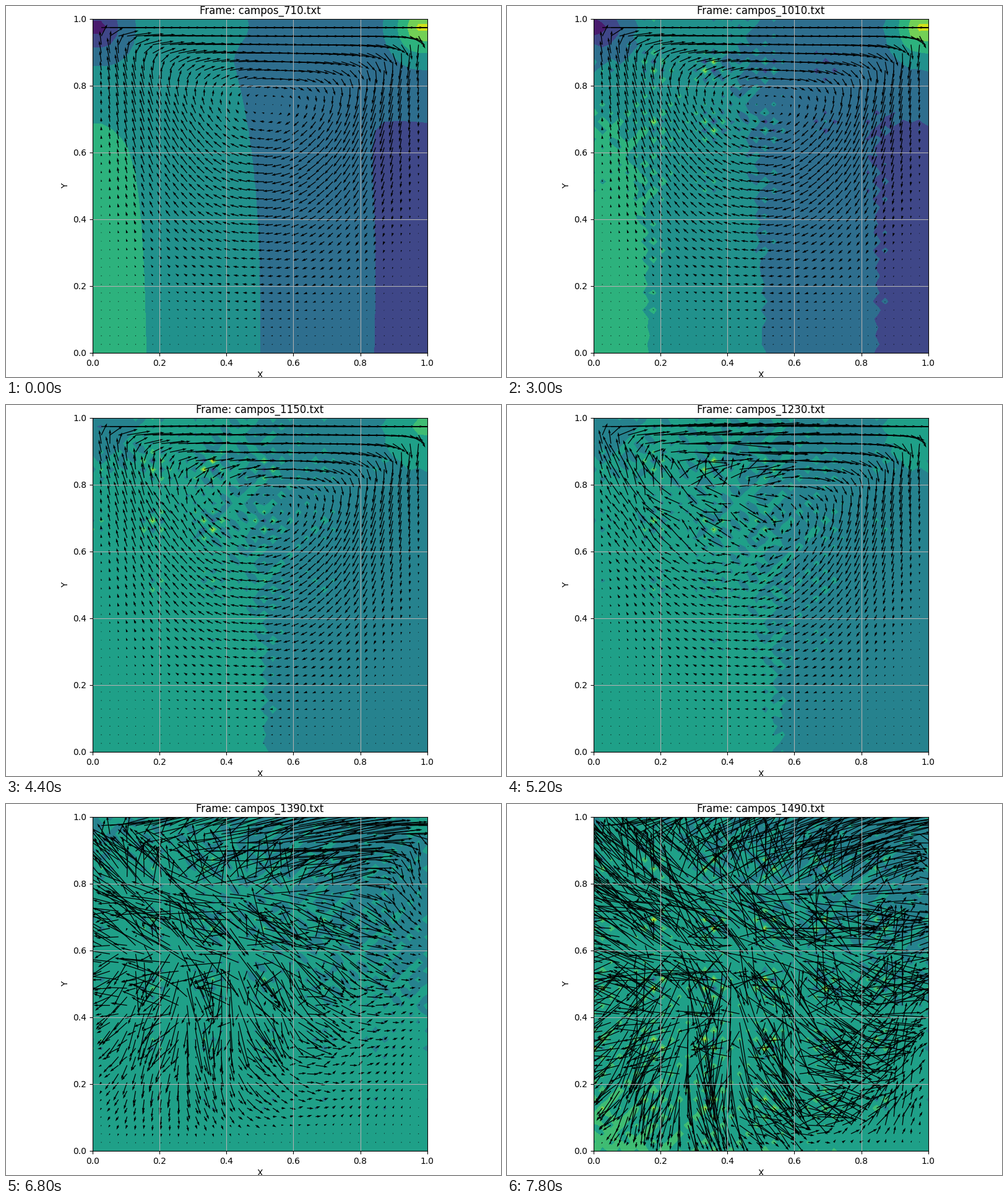
Write a matplotlib script that moves like this. It is 800 px wide and 600 px high and loops after 7900 ms.

```python
import numpy as np
import matplotlib.pyplot as plt
from matplotlib.animation import FuncAnimation

N = 40
H = 1 / (N - 1)
FRAMES = 79
SCALE = 7
INNER = (slice(1, -1), slice(1, -1))

axis = np.linspace(0, 1, N)
X, Y = np.meshgrid(axis, axis)
I, J = np.meshgrid(np.arange(N), np.arange(N))
noise = np.random.default_rng(4).normal(0, 0.25, (2, N, N))

# Stages of the numerical instability
KEYS = [0, 20, 36, 52, 60, 68, 78]
PRESSURE = [0.03, 1.2, 6, 16, 25, 42, 75]
DRIFT = [0.001, 0.004, 0.02, 0.22, 1.1, 7, 18]
VELOCITY = [1e-4, 5e-4, 0.005, 0.05, 0.095, 0.15, 0.21]
RADIUS = [0.28, 0.28, 0.28, 0.31, 0.39, 0.49, 0.6]
CENTRE_X = [0.36, 0.36, 0.36, 0.36, 0.36, 0.38, 0.45]
CENTRE_Y = [0.83, 0.83, 0.83, 0.82, 0.78, 0.71, 0.6]


def at(i, values):
    return np.interp(i, KEYS, values)


def grow(i, values):
    return np.exp(at(i, np.log(values)))


def cavity_flow(nu=1 / 15, dt=0.0015, steps=500):
    """Lid-driven cavity in vorticity / stream function form."""
    k = np.arange(1, N - 1)
    S = np.sqrt(2 * H) * np.sin(np.pi * H * np.outer(k, k))
    lam = (2 - 2 * np.cos(np.pi * k * H)) / H**2
    lam = lam[:, None] + lam
    psi, w = np.zeros((N, N)), np.zeros((N, N))
    for _ in range(steps):
        psi[INNER] = S @ ((S @ w[INNER] @ S) / lam) @ S
        w[0], w[:, 0] = -2 * psi[1] / H**2, -2 * psi[:, 1] / H**2
        w[:, -1] = -2 * psi[:, -2] / H**2
        w[-1] = -2 * psi[-2] / H**2 - 2 / H
        py, px = np.gradient(psi, H)
        wy, wx = np.gradient(w, H)
        lap = (w[1:-1, 2:] + w[1:-1, :-2] + w[2:, 1:-1] + w[:-2, 1:-1]
               - 4 * w[INNER]) / H**2
        w[INNER] += dt * (nu * lap - (py * wx - px * wy)[INNER])
    u, px = np.gradient(psi, H)
    u[-1], px[-1] = 1, 0
    # The lid lies one node below the ghost row
    return np.roll(u, -1, axis=0), np.roll(-px, -1, axis=0)


def corner(x0, sx, sy):
    xc = np.clip(X, H, 1 - H)
    return np.exp(-np.hypot((xc - x0) / sx, (Y - 1 + H) / sy) ** 1.2)


def cavity_pressure():
    a = 1.14 - 0.04 * Y
    b = 0.42 * Y**3 * (1 - 0.7 * np.clip((Y - 0.88) / 0.08, 0, 1))
    xc = np.clip(X, H / 2, 1 - H / 2)
    return (a * np.cos(np.pi * xc) - b * np.sin(np.pi * xc)
            - 3.6 * corner(H, 0.083, 0.0996)
            + 4.4 * corner(1 - H, 0.079, 0.097))


U0, V0 = cavity_flow()
P0 = cavity_pressure()

checker = (-1.0) ** (I + J)
stripes = np.cos(np.pi * (I - J) / 2)
hot = ((1 + np.cos(2 * np.pi * (X - 0.18) / 0.17))
       * (1 + np.cos(2 * np.pi * (Y - 0.86) / 0.18)) / 4) ** 2
walls = np.clip(np.minimum(X, 1 - X) / 0.07, 0, 1)
walls = walls * np.clip(Y / 0.1, 0, 1) * np.clip((1 - Y) / 0.06, 0, 1)

# Shear axis: level near the lid, steeper towards the lower left
shear = -0.1 - 1.5 * np.clip((0.9 - Y) / 0.5, 0, 1) * (1 - 0.7 * X)


def distance(i):
    dx, dy = X - at(i, CENTRE_X), Y - at(i, CENTRE_Y)
    return dx, dy, np.hypot(dx, dy) + 1e-9


def pressure(i):
    r = distance(i)[2]
    env = np.exp(-(r / (1.15 * at(i, RADIUS))) ** 2) + 0.03
    wave = checker * (0.14 + 0.8 * hot) + 0.08 * stripes
    drift = grow(i, DRIFT) * (1.16 - 0.54 * X - Y)
    return P0 + grow(i, PRESSURE) * env * wave + drift


def velocity(i):
    dx, dy, r = distance(i)
    R = at(i, RADIUS)
    amp = SCALE * grow(i, VELOCITY) * np.exp(-(r / R) ** 2) * walls
    core = np.exp(-(r / R) ** 2)

    # Outflow that bends along the lower right walls
    turn = 2.5 * np.clip(X - 0.05, 0, 1) * (1 - Y) * np.minimum(r / 0.55, 1)
    angle = np.arctan2(dy, dx) + turn
    out = 0.9 * np.minimum(r / 0.4, 1)

    # Convergence on the hot spots, plus node-to-node alternation
    cu = -0.45 * np.sin(2 * np.pi * (X - 0.18) / 0.17)
    cv = -0.45 * np.sin(2 * np.pi * (Y - 0.86) / 0.18)
    flip = 0.7 * checker + noise[0]
    u = out * np.cos(angle) + core * (cu + flip * np.cos(shear))
    v = (out * np.sin(angle)
         + core * (cv + flip * np.sin(shear) + 0.6 * noise[1]))
    return U0 + amp * u, V0 + amp * v


def levels(p):
    peak = np.abs(p).max()
    if peak <= 4:
        return np.arange(-3, 5)
    base = 10 ** np.floor(np.log10(peak / 4))
    step = next(s * base for s in (1, 2, 2.5, 5, 10) if s * base >= peak / 4)
    return step * np.arange(-4, 5)


fig = plt.figure(figsize=(8, 6), dpi=100)
ax = fig.add_axes([140.2 / 800, 39 / 600, 540.4 / 800, 540 / 600])
quiver = ax.quiver(X[INNER], Y[INNER], U0[INNER], V0[INNER], scale=SCALE)
ax.set(xlim=(0, 1), ylim=(0, 1), xlabel="X", ylabel="Y")
ax.grid(True)
title = ax.set_title("")
filled = None


def draw(i):
    global filled
    if filled is not None:
        filled.remove()
    p = pressure(i)
    filled = ax.contourf(X, Y, p, levels=levels(p), cmap="viridis", zorder=0.5)
    u, v = velocity(i)
    quiver.set_UVC(u[INNER], v[INNER])
    title.set_text(f"Frame: campos_{710 + 10 * i}.txt")
    return filled, quiver, title


anim = FuncAnimation(fig, draw, frames=FRAMES, interval=100, repeat=True,
                     repeat_delay=0, blit=False)
plt.show()
```
